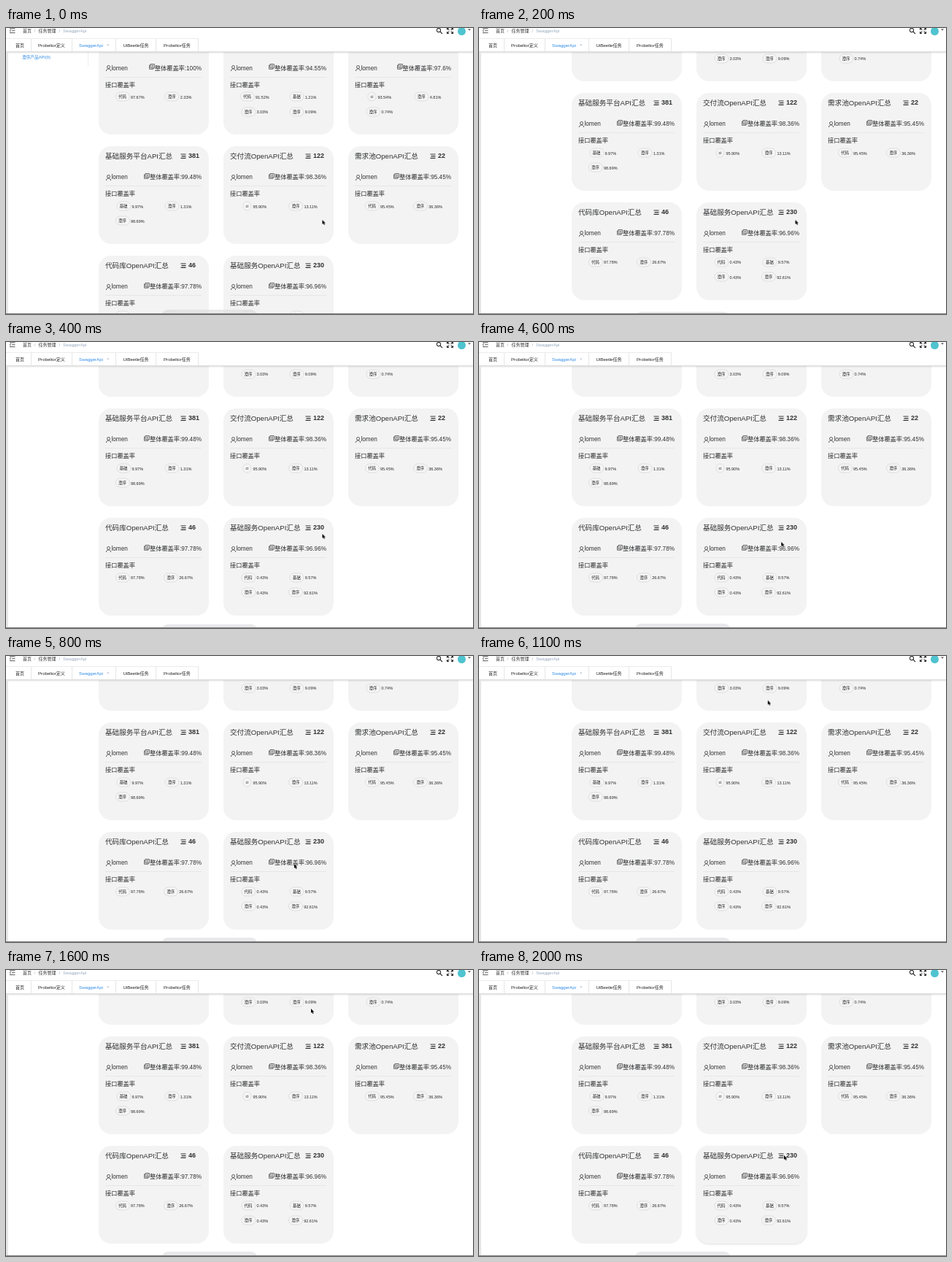
Animation of 640 by 392 pixels, one loop 2.1 s. Source, as an HTML page:

```html
<!DOCTYPE html>
<html>
<head>
<meta charset="utf-8">
<title>API coverage</title>
<style>
  html, body { margin: 0; width: 100%; height: 100%; overflow: hidden; background: #fff; }
  body { position: relative; color: #303133; font-family: "Liberation Sans", "Noto Sans CJK SC", "Noto Sans CJK", sans-serif; }
  body *, .card::after { position: absolute; box-sizing: border-box; white-space: nowrap; }
  svg { overflow: visible; fill: none; stroke: #333; stroke-width: .8; }
  svg * { position: static; }

  .view { left: 0; top: 33px; width: 640px; height: 358px; overflow: hidden; }
  .page { left: 0; top: -33px; width: 640px; height: 460px; animation: scroll 2100ms step-end infinite; }
  .side { left: 22px; top: 35px; font-size: 5.7px; line-height: 10px; font-weight: 500; color: #2f8be6; }
  .side-edge { left: 112px; top: 30px; width: 1px; height: 22px; background: #eee; }

  .card { width: 151px; height: 133.5px; border-radius: 17px; background: #f3f3f3; font-size: 8.2px; line-height: 12px; }
  .card::after { content: ""; left: 9px; right: 10px; top: 54px; height: 1px; background: #e7e7e7; }
  .card.hover { animation: hover 2100ms step-end infinite; }
  .title { left: 9px; top: 8px; font-size: 9.6px; }
  .count { left: 123px; top: 7px; font-size: 9px; font-weight: bold; }
  .owner { left: 17.5px; top: 37px; }
  .total { right: 10px; top: 37px; }
  .total svg { left: -8px; top: -.5px; }
  .label { left: 9px; top: 60px; }
  .tag { display: flex; align-items: center; gap: 1.5px; transform: translate(-50%, -50%); font-size: 5.5px; line-height: 12px; color: #262626; }
  .tag * { position: static; }
  .tag b { font-weight: 500; padding: 0 3.5px; height: 13px; border: 1px solid #dedede; border-radius: 7px; background: #f5f5f5; line-height: 11px; }

  .head { left: 0; top: 0; width: 640px; height: 33px; background: #fff; border-bottom: 1px solid #dcdcdc; box-shadow: 0 1px 2px #0002; }
  .crumb, .tab { font-size: 6px; line-height: 10px; }
  .crumb { top: -1px; }
  .muted { color: #97a8be; }
  .tabs { left: 0; top: 14px; width: 264px; height: 18px; border-top: 1px solid #ececec; }
  .tab { top: 0; height: 17px; line-height: 17px; border-right: 1px solid #e6e6e6; text-align: center; color: #222; font-size: 6.1px; font-weight: 500; }
  .tab.on { color: #2f8be6; }
  .avatar { left: 618.5px; top: -1px; width: 11px; height: 11px; border-radius: 50%; background: #4fc3cf; }
  .strip { left: 0; top: 33px; width: 3px; height: 359px; background: #e7e7e7; }
  .floor { left: 0; top: 391px; width: 640px; height: 1px; background: #858585; }
  .dock { left: 213px; top: 386px; width: 132px; height: 20px; border-radius: 9px 9px 0 0; background: #dcdce0a0; animation: dock 2100ms step-end infinite; }
  .cursor { left: 0; top: 0; animation: point 2100ms infinite; }

  @keyframes scroll {
    0% { transform: none; }
    9.523% { transform: translateY(-73px); }
    14.285% { transform: translateY(-72px); }
    19.047%, 100% { transform: translateY(-71px); }
  }
  @keyframes dock {
    0% { transform: none; }
    9.523% { transform: translateY(3px); }
    14.285% { transform: translateY(2px); }
    19.047% { transform: translateY(1px); }
    23.809%, 100% { transform: none; }
  }
  @keyframes hover {
    0% { box-shadow: none; }
    90.476%, 100% { box-shadow: 0 1px 3px #0002; }
  }
  @keyframes point {
    0% { transform: translate(433.5px, 263px); }
    19.047% { transform: translate(433.5px, 263px); animation-timing-function: steps(4); }
    38.095% { transform: translate(395px, 285px); animation-timing-function: steps(4); }
    57.142% { transform: translate(396px, -14px); animation-timing-function: step-end; }
    71.428% { transform: translate(418px, -14px); animation-timing-function: steps(4); }
    90.476%, 100% { transform: translate(418px, 254px); }
  }
</style>
</head>
<body>
<div class="view">
  <div class="page">
    <div class="side">澄序产品API(9)</div>
    <div class="side-edge"></div>
  </div>
</div>
<div class="head">
  <svg width="14" height="9" stroke-width="1"><path d="M5 .8h7.5M8 3.7h4.5M5 6.6h7.5M6.8 2.2L5 3.7l1.8 1.5"/></svg>
  <span class="crumb" style="left:23px">首页</span>
  <span class="crumb muted" style="left:38.5px">/</span>
  <span class="crumb" style="left:44.5px">任务管理</span>
  <span class="crumb muted" style="left:72.5px">/</span>
  <span class="crumb muted" style="left:78px">SwaggerApi</span>
  <svg width="60" height="10" style="left:590px;top:0">
    <g stroke-width="1.1">
      <circle cx="3" cy="3" r="2.6"/><path d="M5 5l3 3"/>
      <path d="M14.5 2.5V0H17M14.5 0l2.8 2.8M20 0h2.5v2.5M22.5 0l-2.8 2.8M14.5 5v2.5H17M14.5 7.5l2.8-2.8M22.5 5v2.5H20M22.5 7.5l-2.8-2.8"/>
    </g>
    <path d="M43 1.5h4l-2 2z" fill="#444" stroke="none"/>
  </svg>
  <div class="avatar"></div>
  <div class="tabs"></div>
</div>
<div class="strip"></div>
<div class="dock"></div>
<div class="floor"></div>
<svg class="cursor" width="6" height="9"><path d="M0 0v6l1.4-1.2 1 2.3 1.1-.5-1-2.2h1.8z" fill="#000" stroke="#fff" stroke-width=".6" paint-order="stroke"/></svg>
<script>
  // title, count, total coverage, tags
  const cards = [
    ['', '', '100%', '代码 97.67%,澄序 2.33%'],
    ['', '', '94.55%', '代码 91.52%,基础 1.21%,澄序 3.03%,澄序 9.09%'],
    ['', '', '97.6%', 'ci 93.54%,澄序 4.81%,澄序 0.74%'],
    ['基础服务平台API汇总', 381, '99.48%', '基础 9.97%,澄序 1.31%,澄序 98.69%'],
    ['交付流OpenAPI汇总', 122, '98.36%', 'ci 95.90%,澄序 13.11%'],
    ['需求池OpenAPI汇总', 22, '95.45%', '代码 95.45%,澄序 36.36%'],
    ['代码库OpenAPI汇总', 46, '97.78%', '代码 97.78%,澄序 26.67%'],
    ['基础服务OpenAPI汇总', 230, '96.96%', '代码 0.43%,基础 9.57%,澄序 0.43%,澄序 92.61%'],
  ];
  const tabs = [['首页', 4, 35], ['Probeltor定义', 35, 91], ['SwaggerApi', 91, 151], ['UiBeetle任务', 151, 206], ['Probeltor任务', 206, 264]];

  const tagHtml = (tag, i) => {
    const [name, value] = tag.split(' ');
    return `<div class="tag" style="left:${42.5 + i % 2 * 66.3}px;top:${81.8 + (i >> 1) * 20.2}px"><b>${name}</b><span>${value}</span></div>`;
  };

  const cardHtml = ([title, count, total, tags], i) => `
    <div class="card${i === cards.length - 1 ? ' hover' : ''}" style="left:${127 + i % 3 * 171}px;top:${12.6 + Math.floor(i / 3) * 149.8}px">
      <div class="title">${title}</div>
      <svg width="9" height="8" style="left:112px;top:9.5px"><path d="M.5 1h7M1.5 3.7h6M.5 6.4h7" stroke-width="1.2"/></svg>
      <div class="count">${count}</div>
      <svg width="8" height="9" style="left:10px;top:38.5px"><circle cx="3.5" cy="2.5" r="2"/><path d="M.4 8c0-4 6.2-4 6.2 0"/></svg>
      <div class="owner">lomen</div>
      <div class="total"><svg width="8" height="8"><path d="M2 .5h5.3v5.3H2zM2 2H.5v5.3h5.3V5.8M3.4 2.3H6M3.4 4H6" stroke-width=".7"/></svg>整体覆盖率:${total}</div>
      <div class="label">接口覆盖率</div>
      ${tags.split(',').map(tagHtml).join('')}
    </div>`;

  const tabHtml = ([name, from, to], i) =>
    `<div class="tab${i === 2 ? ' on' : ''}" style="left:${from}px;width:${to - from}px${i === 2 ? ';padding-right:8px' : ''}">${name}</div>`;

  document.querySelector('.page').insertAdjacentHTML('beforeend', cards.map(cardHtml).join(''));
  document.querySelector('.tabs').innerHTML = tabs.map(tabHtml).join('') +
    '<span class="muted" style="left:138px;top:0;font-size:6px;line-height:17px">×</span>';
</script>
</body>
</html>
```
